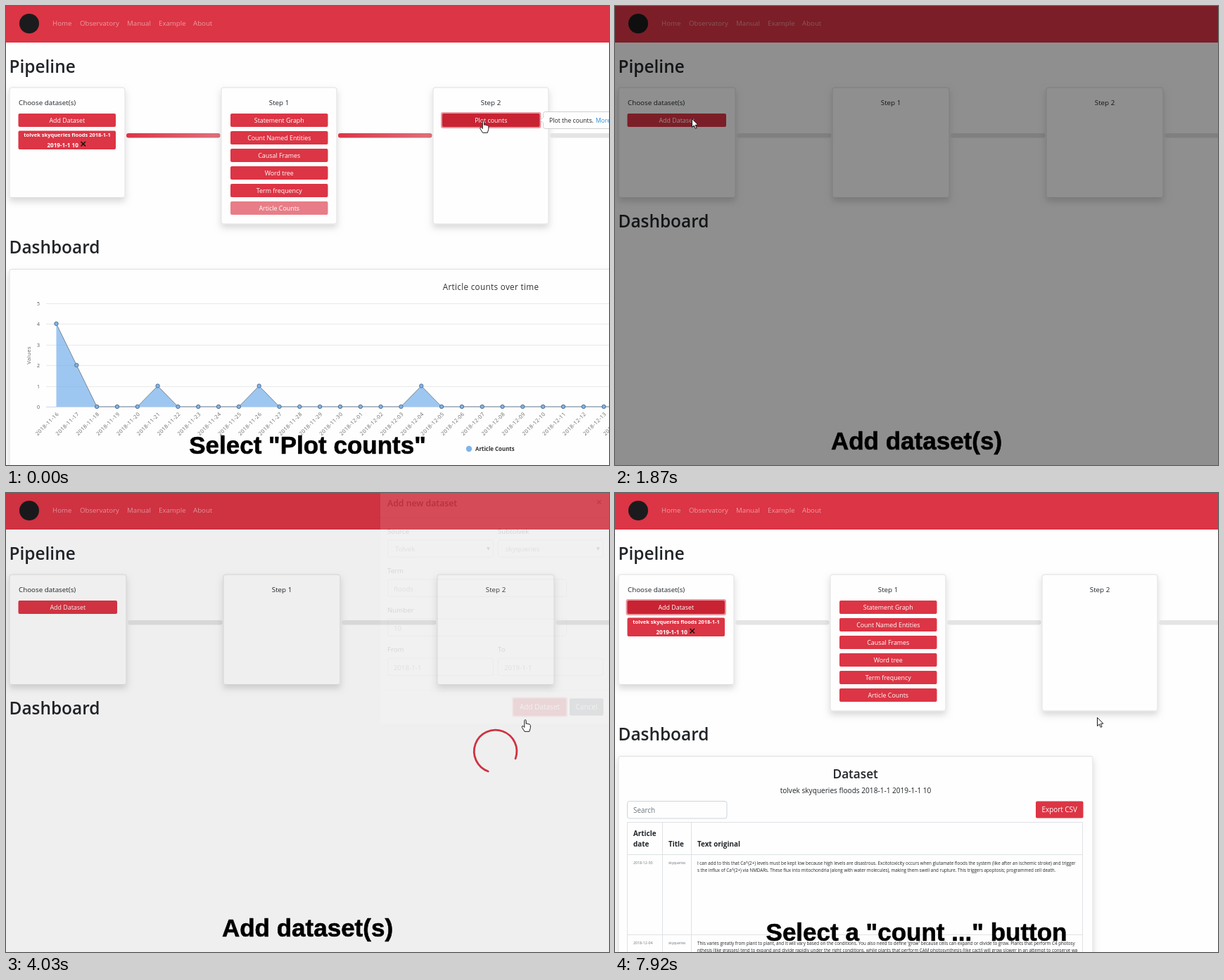
Recreate the animation shown at these times as an HTML page with a canvas. Size 857 px wide and 653 px high, loop 8000 ms.

```html
<!DOCTYPE html>
<html lang="en">
<head>
<meta charset="utf-8">
<title>Pipeline walkthrough</title>
<style>
html, body { margin: 0; width: 100%; height: 100%; overflow: hidden; background: #fefefe; }
canvas { display: block; width: 857px; height: 653px; }
</style>
</head>
<body>
<canvas id="stage" width="857" height="653"></canvas>
<script>
const W = 857, H = 653, LOOP = 8000;
const stage = document.getElementById('stage').getContext('2d');
const layer = Object.assign(document.createElement('canvas'), { width: W, height: H }).getContext('2d');
let ctx = stage;
const RED = '#dc3545', DARK_RED = '#c82333', INK = '#212529', GREY = '#6c757d', BLUE = '#7cb5ec';
const SANS = '"Open Sans", "Noto Sans", sans-serif';
const SITE = 'tolvek', BOARD = 'skyqueries';

// Bursts of screen updates: first, last, count
const RUNS = [
  [470, 1250, 11], [1480, 2270, 11], [2330, 3100, 11], [3190, 3330, 3], [3790, 4580, 11],
  [4660, 5430, 11], [5500, 6290, 11], [6370, 6600, 4], [7690, 7920, 4]
];
const DIM_IN = 1743, MODAL_IN = 1893, MODAL_OUT = 3895, FOCUS_BACK = 4250, DATA_IN = 6440, NEXT_CAPTION = 6900;

const clamp = v => Math.max(0, Math.min(1, v));
const easeOut = (p, power) => 1 - Math.pow(1 - clamp(p), power);
const mix = (a, b, p) => a + (b - a) * p;

function snap(t) {
  let s = 0;
  for (const [a, b, n] of RUNS) {
    if (t < a) break;
    const step = (b - a) / (n - 1);
    s = a + Math.min(n - 1, Math.floor((t - a + 18) / step)) * step;
  }
  return s;
}

// Paints a group and lays it down with one shared opacity
function grouped(alpha, dy, paint) {
  ctx = layer;
  ctx.clearRect(0, 0, W, H);
  ctx.save();
  ctx.translate(0, dy);
  paint();
  ctx.restore();
  ctx = stage;
  ctx.globalAlpha = alpha;
  ctx.drawImage(layer.canvas, 0, 0);
  ctx.globalAlpha = 1;
}

function text(s, x, y, size, color = INK, align = 'left', weight = 400, spacing = 0) {
  ctx.font = `${weight} ${size}px ${SANS}`;
  ctx.letterSpacing = spacing + 'px';
  ctx.textAlign = align;
  ctx.fillStyle = color;
  ctx.fillText(s, x, y);
  ctx.letterSpacing = '0px';
}

function box(x, y, w, h, r, fill, stroke) {
  ctx.beginPath();
  ctx.roundRect(x, y, w, h, r);
  if (fill) { ctx.fillStyle = fill; ctx.fill(); }
  if (stroke) { ctx.strokeStyle = stroke; ctx.lineWidth = 1; ctx.stroke(); }
}

function line(x1, y1, x2, y2, color) {
  ctx.beginPath();
  ctx.moveTo(x1, y1);
  ctx.lineTo(x2, y2);
  ctx.strokeStyle = color;
  ctx.lineWidth = 1;
  ctx.stroke();
}

function disc(x, y, r, fill) {
  ctx.beginPath();
  ctx.arc(x, y, r, 0, Math.PI * 2);
  ctx.fillStyle = fill;
  ctx.fill();
}

function card(x, y, w, h) {
  ctx.save();
  ctx.shadowColor = 'rgba(0,0,0,.15)';
  ctx.shadowBlur = 10;
  ctx.shadowOffsetY = 5;
  box(x, y, w, h, 3, '#fefefe');
  ctx.restore();
  box(x + .5, y + .5, w - 1, h - 1, 3, null, '#dfdfdf');
}

function button(label, x, y, w, { h = 19, size = 8.9, state = '', fill = RED } = {}) {
  if (state === 'focus') box(x - 2, y - 2, w + 4, h + 4, 3, 'rgba(220,53,69,.5)');
  box(x, y, w, h, 2, state === 'off' ? '#e87d87' : state ? DARK_RED : fill);
  text(label, x + w / 2, y + h / 2 + size * .36, size, '#fff', 'center');
}

function header() {
  ctx.fillStyle = RED;
  ctx.fillRect(0, 0, W, 52);
  disc(33, 25, 14, '#1b1b1d');
  const nav = [['Home', 66], ['Observatory', 105], ['Manual', 172], ['Example', 217], ['About', 266]];
  for (const [s, x] of nav) text(s, x, 27.8, 9.7, 'rgba(255,255,255,.5)');
}

function link(x1, x2, active) {
  let fill = '#e4e4e4';
  if (active) {
    fill = ctx.createLinearGradient(x1, 0, x2, 0);
    fill.addColorStop(0, RED);
    fill.addColorStop(1, '#e0717c');
  }
  box(x1, 181, x2 - x1, 6.6, 3, fill);
}

function pipeline(filled, charted, state) {
  const gap = filled ? 301 : 304, w = filled ? 165 : 167;
  text('Pipeline', 4.5, 95, 24.4, INK, 'left', 600);
  for (let i = 0; i < 3; i++) {
    const x = 4.5 + i * gap;
    card(x, 115.5, w, filled && i ? 195 : 157.5);
    link(x + w + 1.5, x + gap - 1, charted && i < 2);
    if (i) text('Step ' + i, x + w / 2, 141, 9.8, INK, 'center');
  }
  text('Choose dataset(s)', 18, 141, 9.8);
  button('Add Dataset', 17.5, 153, w - 26.5, { state });
  if (!filled) return;

  box(17.5, 177.5, 138.5, 26.5, 2, RED);
  text(`${SITE} ${BOARD} floods 2018-1-1`, 87, 186.3, 7.5, '#fff', 'center', 700);
  text('2019-1-1 10', 58.5, 200.5, 8.1, '#fff', 'left', 700);
  ctx.beginPath();
  ctx.moveTo(106.5, 193); ctx.lineTo(113, 199.5);
  ctx.moveTo(113, 193); ctx.lineTo(106.5, 199.5);
  ctx.strokeStyle = '#111';
  ctx.lineWidth = 1.5;
  ctx.stroke();

  ['Statement Graph', 'Count Named Entities', 'Causal Frames', 'Word tree', 'Term frequency', 'Article Counts']
    .forEach((s, i) => button(s, 319, 153 + 25 * i, 138.5, { state: charted && i === 5 ? 'off' : '' }));
}

function tooltip() {
  button('Plot counts', 620, 153, 138.5, { state: 'focus' });
  box(763.5, 150.5, 130, 24, 3, '#fefefe', '#cfcfcf');
  ctx.beginPath();
  ctx.moveTo(764, 158);
  ctx.lineTo(759.5, 162.5);
  ctx.lineTo(764, 167);
  ctx.fillStyle = '#fefefe';
  ctx.fill();
  ctx.strokeStyle = '#cfcfcf';
  ctx.stroke();
  text('Plot the counts.', 772, 166, 8.7);
  text('More', 838, 166, 8.7, '#2a8fdc');
}

function chart() {
  card(4.5, 374, 1360, 400);
  text('Article counts over time', 689, 403.5, 11.7, '#333', 'center', 400, .33);
  const yOf = v => 570 - 29.5 * v, xOf = i => 71.5 + 28.82 * i;
  for (let v = 0; v <= 5; v++) {
    const y = Math.round(yOf(v)) + .5;
    line(57, y, W, y, v ? '#e9e9e9' : '#ccd6eb');
    text(v, 48, y + 2.5, 7, '#555', 'right');
  }
  ctx.save();
  ctx.translate(35, 497);
  ctx.rotate(-Math.PI / 2);
  text('Values', 0, 0, 7.8, '#666', 'center', 400, .3);
  ctx.restore();

  const peaks = { 0: 4, 1: 2, 5: 1, 10: 1, 18: 1 }, count = 30;
  const trace = () => {
    ctx.beginPath();
    for (let i = 0; i < count; i++) ctx.lineTo(xOf(i), yOf(peaks[i] || 0));
  };
  trace();
  ctx.lineTo(xOf(0), yOf(0));
  ctx.fillStyle = 'rgba(124,181,236,.75)';
  ctx.fill();
  trace();
  ctx.strokeStyle = '#7c8794';
  ctx.lineWidth = 1;
  ctx.stroke();
  for (let i = 0; i < count; i++) {
    disc(xOf(i), yOf(peaks[i] || 0), 2.7, BLUE);
    ctx.strokeStyle = '#56708f';
    ctx.stroke();
    ctx.save();
    ctx.translate(xOf(i) + 4, 581);
    ctx.rotate(-Math.PI / 4);
    const day = new Date(Date.UTC(2018, 10, 16 + i)).toISOString().slice(0, 10);
    text(day, 0, 0, 7.5, '#666', 'right', 400, .4);
    ctx.restore();
  }
  disc(658, 630, 4.2, BLUE);
  text('Article Counts', 667, 633, 7.9, '#333', 'left', 700);
}

function table() {
  card(4.5, 374, 675, 400);
  text('Dataset', 341.7, 405.5, 17.2, INK, 'center', 600);
  text(`${SITE} ${BOARD} floods 2018-1-1 2019-1-1 10`, 342, 426.5, 10.1, INK, 'center');
  box(17.5, 438.5, 141.5, 24.5, 3, '#fefefe', '#ced4da');
  text('Search', 26, 455, 9.9, GREY);
  button('Export CSV', 598, 438.5, 67.5, { h: 24, size: 9.9 });

  for (const y of [468.5, 514.5, 628.5]) line(17.5, y, 664.5, y, '#dee2e6');
  for (const x of [17.5, 67.5, 108.5, 664.5]) line(x, 468.5, x, H, '#dee2e6');
  for (const [s, x, y] of [['Article', 26, 488], ['date', 26, 503], ['Title', 76, 503], ['Text original', 117, 503]])
    text(s, x, y, 9.9, INK, 'left', 700);

  const rows = [
    ['2018-12-30', 529,
      'I can add to this that Ca^(2+) levels must be kept low because high levels are disastrous. Excitotoxicity occurs when glutamate floods the system (like after an ischemic stroke) and trigger',
      's the influx of Ca^(2+) via NMDARs. These flux into mitochondria (along with water molecules), making them swell and rupture. This triggers apoptosis; programmed cell death.'],
    ['2018-12-04', 643,
      "This varies greatly from plant to plant, and it will vary based on the conditions. You also need to define 'grow' because cells can expand or divide to grow. Plants that perform C4 photosy",
      'nthesis (like grasses) tend to expand and divide rapidly under the right conditions, while plants that perform CAM photosynthesis (like cacti) will grow slower in an attempt to conserve wa']
  ];
  for (const [date, y, first, second] of rows) {
    text(date, 26, y - 1, 5.3, GREY);
    text(BOARD, 76, y - 1, 4.9, GREY);
    text(first, 117, y, 6.28);
    text(second, 117, y + 9.5, 6.28);
  }
}

function spinner(t) {
  const a = (t - 4027) / 750 * Math.PI * 2, deg = Math.PI / 180;
  ctx.beginPath();
  ctx.arc(695.6, 367.5, 30.3, a + 110 * deg, a + 380 * deg);
  ctx.strokeStyle = RED;
  ctx.lineWidth = 2.8;
  ctx.lineCap = 'round';
  ctx.stroke();
  ctx.lineCap = 'butt';
}

function field(label, value, x, y, w, select) {
  text(label, x, y, 9.7);
  box(x + .5, y + 9, w, 24.5, 3, '#fff', '#ced4da');
  text(value, x + (select ? 11 : 9), y + 25.8, 9.7, GREY);
  if (!select) return;
  const ax = x + w - 6.5, ay = y + 19.5;
  ctx.beginPath();
  ctx.moveTo(ax - 2.5, ay);
  ctx.lineTo(ax + 2.5, ay);
  ctx.lineTo(ax, ay + 4.5);
  ctx.fillStyle = '#343a40';
  ctx.fill();
}

function dialog(state) {
  box(532, 14.5, 327, 333.5, 3, '#fff');
  text('Add new dataset', 542, 39, 12.3, INK, 'left', 600);
  text('×', 843, 38.5, 14, '#7f7f7f', 'center', 700);
  line(532, 55.5, W, 55.5, '#e3e6e9');
  line(532, 301.5, W, 301.5, '#e3e6e9');
  field('Source', 'Tolvek', 542, 78, 150, true);
  field('Subtolvek', BOARD, 699, 78, 149, true);
  field('Term', 'floods', 542, 134.3, 254);
  field('Number', '10', 542, 190.5, 254);
  field('From', '2018-1-1', 542, 246.5, 150);
  field('To', '2019-1-1', 699, 246.5, 149);
  button('Add Dataset', 721, 312.5, 75, { h: 24.5, size: 10, state });
  button('Cancel', 801, 312.5, 48, { h: 24.5, size: 10, fill: GREY });
}

function modal(t) {
  const alpha = clamp((t - MODAL_IN) / 150) * (1 - clamp((t - MODAL_OUT) / 150));
  if (!alpha) return;
  const lift = t < MODAL_OUT ? 1 - easeOut((t - MODAL_IN) / 300, 1.7) : easeOut((t - MODAL_OUT) / 300, 1.7);
  const state = t >= 3790 ? 'focus' : t >= 3190 ? 'hover' : '';
  grouped(alpha, -32.5 * lift, () => dialog(state));
}

const ARROW = [[0, 0], [0, 12], [2.8, 9.5], [4.8, 13.8], [6.6, 13], [4.7, 8.8], [8.4, 8.6]];
const HAND = [[-1.2, 1], [0, 0], [1.2, 1], [1.2, 5.8], [3, 5.4], [4, 6.4], [5.8, 6.2], [7.3, 7.8],
  [7.3, 12], [5.8, 16.8], [-1, 16.8], [-4.6, 11], [-4.6, 9.4], [-3, 9], [-1.2, 11]];

function cursor(x, y, hand) {
  ctx.beginPath();
  for (const [dx, dy] of hand ? HAND : ARROW) ctx.lineTo(x + dx + .5, y + dy + .5);
  ctx.closePath();
  ctx.fillStyle = '#fff';
  ctx.fill();
  ctx.strokeStyle = '#1c1c1c';
  ctx.lineWidth = 1;
  ctx.lineJoin = 'round';
  ctx.stroke();
}

// Start, duration, easing power, end point
const MOVES = [
  [392, 858, 2.87, 109, 160],
  [2190, 60, 1, 124, 172],
  [2252, 850, 2.4, 723, 322],
  [3190, 140, 1, 737.5, 322],
  [7612, 308, 1.5, 685, 319]
];

function pointer(t) {
  let x = 625, y = 588;
  for (const [start, span, power, ex, ey] of MOVES) {
    const p = easeOut((t - start) / span, power);
    x = mix(x, ex, p);
    y = mix(y, ey, p);
  }
  const hand = (t >= 1300 && t < DIM_IN) || (t >= 3190 && t < 4180);
  cursor(x, y, hand);
}

function caption(s, y) {
  ctx.font = 'bold 35px "Liberation Sans", Arial, sans-serif';
  ctx.textAlign = 'center';
  ctx.fillStyle = ctx.strokeStyle = '#000';
  ctx.lineWidth = .6;
  ctx.fillText(s, 428.5, y);
  ctx.strokeText(s, 428.5, y);
}

function draw(now) {
  const raw = now % LOOP;
  const charted = raw < 90;
  const t = raw >= 1310 && raw < 1480 ? 1310 : snap(raw);
  const filled = charted || t >= DATA_IN;

  ctx.fillStyle = '#fefefe';
  ctx.fillRect(0, 0, W, H);
  header();
  const hovered = t >= 1090 && t < DIM_IN;
  pipeline(filled, charted, charted ? '' : t >= FOCUS_BACK ? 'focus' : hovered ? 'hover' : '');
  text('Dashboard', 4.5, filled ? 352.3 : 315, 24.4, INK, 'left', 600);

  if (charted) {
    tooltip();
    chart();
    cursor(678, 163, true);
    caption('Select "Plot counts"', 637);
    return;
  }
  if (filled) table();
  else if (t >= MODAL_OUT) spinner(t);

  const dim = .5 * clamp((t - DIM_IN) / 150) * (1 - clamp((t - MODAL_OUT) / 150));
  if (dim) {
    ctx.fillStyle = `rgba(0,0,0,${dim})`;
    ctx.fillRect(0, 0, W, H);
  }
  modal(t);
  pointer(t);
  if (raw >= NEXT_CAPTION) caption('Select a "count ..." button', 637);
  else caption('Add dataset(s)', 631);
}

function loop() {
  draw(performance.now());
  requestAnimationFrame(loop);
}
loop();
</script>
</body>
</html>
```
